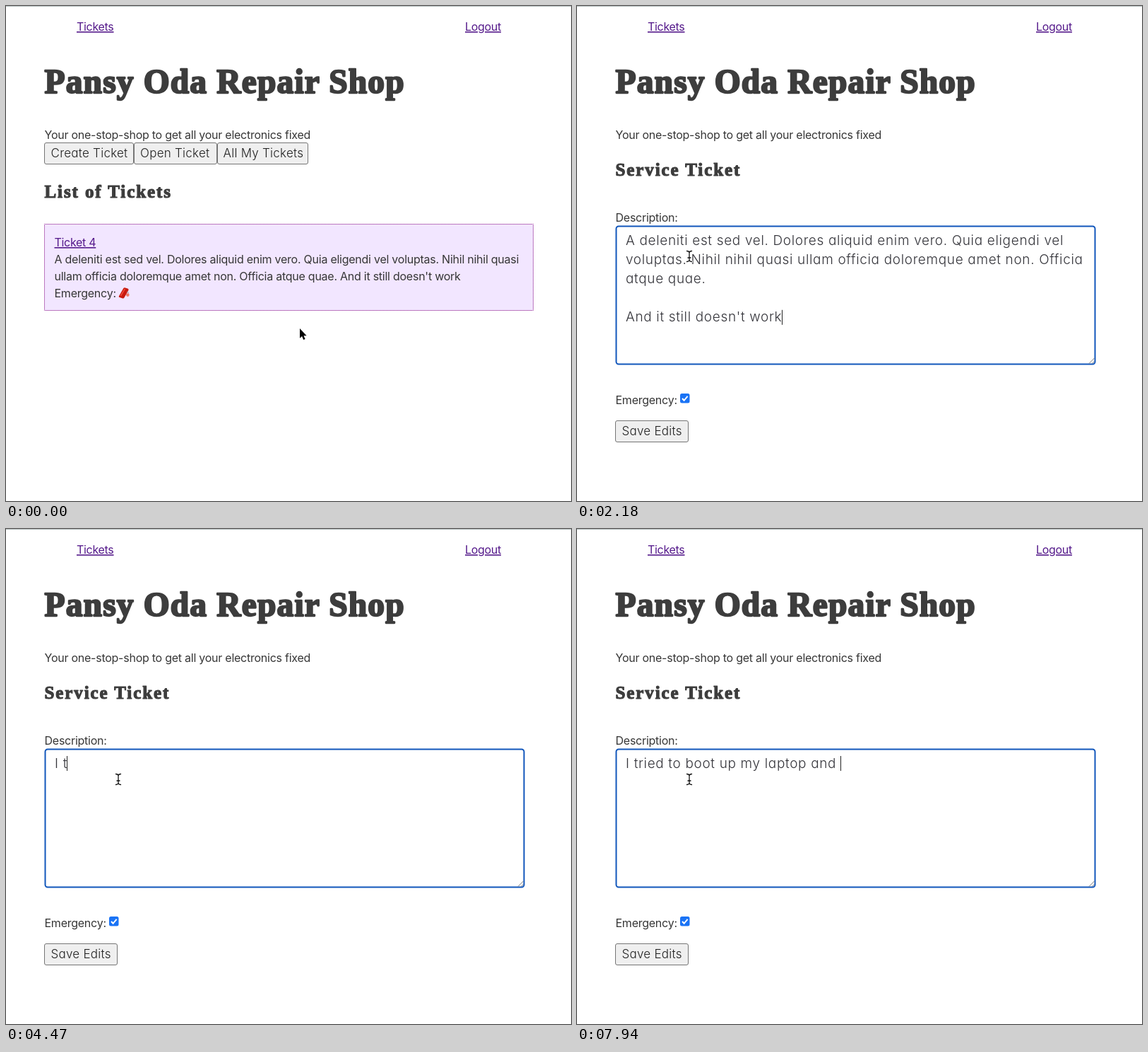
An HTML page that plays this animation: 800 px wide and 700 px high, repeating every 8 s.

```html
<!DOCTYPE html>
<html lang="en">
<head>
<meta charset="utf-8">
<title>Service ticket</title>
<style>
  html, body { margin: 0; width: 100%; height: 100%; overflow: hidden; background: #fff; }
  svg { display: block; width: 800px; height: 700px; }
  text { font: 400 16px Inter, sans-serif; letter-spacing: -.25px; fill: #363636; white-space: pre; }
  .h1, .h2 { font: 700 47.5px "Liberation Serif", serif; letter-spacing: 1.15px; fill: #3d3d3d;
             stroke: #3d3d3d; stroke-width: 2.3px; stroke-linejoin: round; }
  .h2 { font-size: 25px; letter-spacing: 1.9px; stroke-width: 1.2px; }
  .link { fill: #551a8b; text-decoration: underline; letter-spacing: -.3px; }
  .round { font-size: 17px; font-weight: 300; letter-spacing: .25px; font-feature-settings: "cv11"; fill: #222; }
  .area { font-size: 19px; letter-spacing: .65px; fill: #34343a; }
  .button { fill: #efefef; stroke: #767676; }
</style>
</head>
<body>
<svg id="stage" viewBox="0 0 800 700" xmlns="http://www.w3.org/2000/svg">
  <rect width="800" height="700" fill="#fff"/>
  <rect width="800" height="1" fill="#b9c3c2"/>
  <text class="link" x="100" y="35">Tickets</text>
  <text class="link" x="650" y="35">Logout</text>
  <text class="h1" x="54.5" y="123">Pansy Oda Repair Shop</text>
  <text x="54.5" y="188">Your one-stop-shop to get all your electronics fixed</text>

  <g id="list">
    <g class="button">
      <rect x="54.5" y="193.5" width="126" height="30" rx="2.5"/>
      <rect x="181.5" y="193.5" width="117" height="30" rx="2.5"/>
      <rect x="299.5" y="193.5" width="128" height="30" rx="2.5"/>
    </g>
    <text class="round" x="63.5" y="214">Create Ticket</text>
    <text class="round" x="190" y="214">Open Ticket</text>
    <text class="round" x="307.5" y="214">All My Tickets</text>
    <text class="h2" x="54.5" y="270.5">List of Tickets</text>
    <rect x="54.5" y="308.5" width="692" height="122" fill="#f2e6ff" stroke="#800080" stroke-dasharray="1 1" stroke-dashoffset=".5"/>
    <text id="ticket" class="link" x="68.5" y="340">Ticket 4</text>
    <text x="68.5" y="364">A deleniti est sed vel. Dolores aliquid enim vero. Quia eligendi vel voluptas. Nihil nihil quasi</text>
    <text x="68.5" y="388">ullam officia doloremque amet non. Officia atque quae. And it still doesn't work</text>
    <text x="68.5" y="412">Emergency:</text>
    <path d="M159.8 410.5L166.4 399Q167.4 398 168.8 398.4L172.8 399.8Q174 400.6 173.4 402L167.4 412.6Q166.6 413.8 165.2 413.4L160.8 412Q159.4 411.6 159.8 410.5Z" fill="#c8190f"/>
    <path d="M162.3 410L168.4 400" stroke="#ec4a38" stroke-width="1.6"/>
    <path d="M171 404q2.5 0 2.6 2.4" fill="none" stroke="#999"/>
    <circle cx="172.3" cy="408.6" r="2.3" fill="#ee7a68"/>
  </g>

  <g id="form">
    <text class="h2" x="54.5" y="239.5">Service Ticket</text>
    <text x="54.5" y="305">Description:</text>
    <rect x="55.5" y="311.5" width="678" height="195" rx="3.5" fill="#fff" stroke="#1156bb" stroke-width="2"/>
    <path d="M725 505.5l7.5-7.5M729.5 505.5l3-3" stroke="#777"/>
    <path id="marks" fill="#b8d6fd" d="M69 318.5H687V346H725V373H188V400H74V427H285V454.5H69Z"/>
    <g id="lines"></g>
    <rect id="caret" width="1" height="21" fill="#222"/>
    <text x="54.5" y="563">Emergency:</text>
    <rect x="146" y="548" width="13.5" height="13.5" rx="2.5" fill="#1a73f5"/>
    <path d="M149 555l2.6 2.8 5-6" fill="none" stroke="#fff" stroke-width="2"/>
    <rect class="button" x="54.5" y="586.5" width="103" height="30" rx="2.5"/>
    <text class="round" x="63.5" y="607">Save Edits</text>
  </g>

  <circle id="click" cx="107" cy="335" r="22" fill="#fa3a3f"/>
  <g id="pointer">
    <path id="arrow" d="M0 0V13.8L3.1 11L5.2 16L7.6 15L5.5 10.2H9.6Z" stroke="#fff" stroke-width="1.6" paint-order="stroke"/>
    <g id="hand" transform="translate(1 0)" fill="#fff" stroke="#111" stroke-linejoin="round">
      <path d="M-1.6 1C-1.6-1 1.2-1 1.2 1V6C1.5 4.8 4 4.9 4 6.4C4.6 5.4 6.8 5.6 6.8 7C7.4 6.3 9.2 6.6 9.2 8V11C9.2 13.5 7.8 14.5 7.5 17H0C-.5 14.5-3 12.5-4.8 9.8C-5.7 8.4-4 7-2.7 8L-1.6 9.2Z"/>
      <path d="M2 10v4M4 10v4M6 10v4" stroke-width=".9"/>
    </g>
    <g id="beam" fill="none" stroke-linecap="round">
      <path id="bar" d="M-3.5-7.5Q-.6-7.6 0-5.5Q.6-7.6 3.5-7.5M0-5.5V5.5M-3.5 7.5Q-.6 7.6 0 5.5Q.6 7.6 3.5 7.5M-2 2H2" stroke="#fff" stroke-width="3"/>
      <path id="core" stroke="#111" stroke-width="1.3"/>
    </g>
  </g>
</svg>
<script>
const LOOP = 8000, CLICK = 1410, OPEN = 1530, SELECT = 2760, TYPE = 3240;
const $ = id => document.getElementById(id);
const show = (id, on) => { $(id).style.display = on ? "" : "none"; };
const clamp = v => Math.max(0, Math.min(1, v));
const ease = v => v * v * (3 - 2 * v);

const BODY = [
  "A deleniti est sed vel. Dolores aliquid enim vero. Quia eligendi vel",
  "voluptas. Nihil nihil quasi ullam officia doloremque amet non. Officia",
  "atque quae.", "", "And it still doesn't work"
];
const baseY = row => 337.5 + row * 27.2;
$("lines").innerHTML = BODY.map((_, i) =>
  `<text class="round area" x="69" y="${baseY(i)}" xml:space="preserve"></text>`).join("");
const rows = [...$("lines").children];
$("core").setAttribute("d", $("bar").getAttribute("d"));

// Typing bursts: start, gap between keys, keys ("<" is backspace)
const BURSTS = [
  [TYPE, 50, "I "], [3760, 120, "try"], [4240, 230, "<<"], [4760, 68, "ried to "],
  [5470, 60, "boto"], [5880, 60, "<<ot "], [6410, 80, "up m"], [6760, 1, "y "],
  [6940, 90, "lap"], [7290, 30, "top"], [7590, 87, " and "]
];
// Times when the blinking caret is off
const CARET_OFF = [[2260, SELECT], [SELECT, TYPE], [3530, 3760]];
// Pointer stops: time, x, y
const STOPS = [[60, 416, 456], [820, 108, 338], [880, 107, 335], [1980, 107, 335], [2180, 159, 354]];

function typed(t) {
  let s = "";
  for (const [start, gap, keys] of BURSTS)
    [...keys].forEach((k, i) => {
      if (t >= start + i * gap) s = k === "<" ? s.slice(0, -1) : s + k;
    });
  return s;
}

function pointerAt(t) {
  let [, x, y] = STOPS[0];
  for (let i = 1; i < STOPS.length; i++) {
    const [t0, x0, y0] = STOPS[i - 1], [t1, x1, y1] = STOPS[i];
    if (t < t0) break;
    const k = ease(clamp((t - t0) / (t1 - t0)));
    x = x0 + (x1 - x0) * k;
    y = y0 + (y1 - y0) * k;
  }
  return [x, y];
}

function drawForm(t) {
  const lines = t < TYPE ? BODY : [typed(t)];
  rows.forEach((row, i) => {
    const s = lines[i] || "";
    if (row.textContent !== s) row.textContent = s;
  });
  const last = lines.length - 1;
  $("caret").setAttribute("x", Math.floor(69 + rows[last].getComputedTextLength()));
  $("caret").setAttribute("y", baseY(last) - 16.5);
  show("caret", !CARET_OFF.some(([a, b]) => t >= a && t < b));
  show("marks", t >= SELECT && t < TYPE);
}

function draw(t) {
  const form = t >= OPEN;
  show("list", !form);
  show("form", form);
  if (form) drawForm(t);
  $("ticket").style.fill = t >= CLICK ? "#ee1111" : "";

  const [x, y] = pointerAt(t);
  const hover = !form && x < 127 && y < 346;
  $("pointer").setAttribute("transform", `translate(${x.toFixed(1)} ${y.toFixed(1)})`);
  show("arrow", !form && !hover);
  show("hand", hover);
  show("beam", form);

  show("click", t >= CLICK && t < 1760);
  $("click").setAttribute("opacity", .72 * (1 - clamp((t - 1480) / 280)));
}

const began = performance.now();
function tick() {
  draw((performance.now() - began) % LOOP);
  requestAnimationFrame(tick);
}
tick();
</script>
</body>
</html>
```
